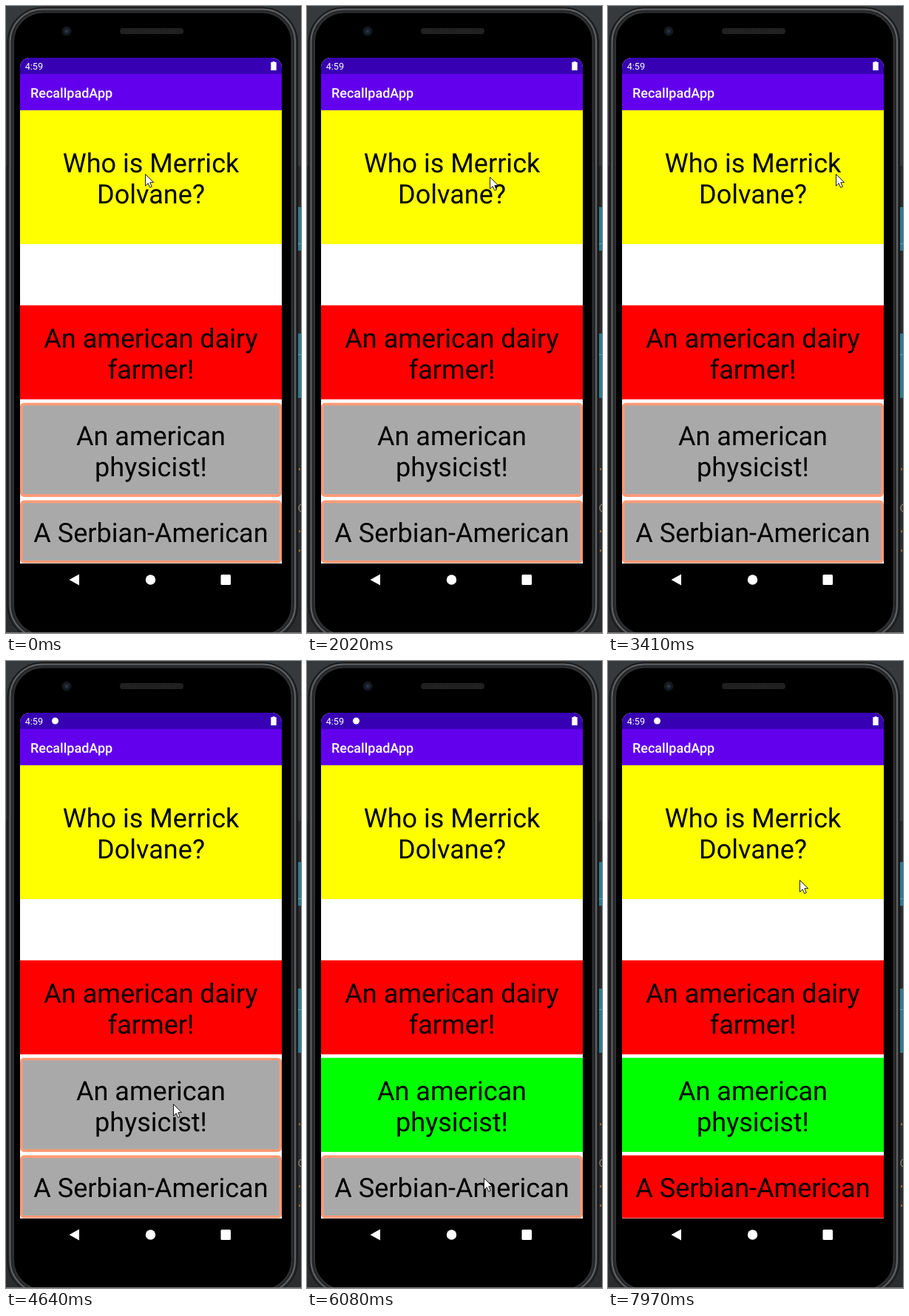
Animation, 399 px wide and 848 px high, one loop 8 s. Source, as an HTML page:

```html
<!DOCTYPE html>
<html lang="en">
<head>
<meta charset="utf-8">
<title>Flashcards</title>
<style>
  html, body { margin: 0; width: 100%; height: 100%; overflow: hidden; background: #2b2c2e; }
  svg { display: block; width: 399px; height: 848px; }
  text { font-family: Roboto, "Open Sans", sans-serif; text-rendering: geometricPrecision; }
  .big { font-size: 36.06px; text-anchor: middle; fill: #000; }
</style>
</head>
<body>
<svg viewBox="0 0 399 848">
  <defs>
    <clipPath id="screen"><path d="M19 754V83a13 13 0 0 1 13-13H360a13 13 0 0 1 13 13V754z"/></clipPath>
    <pattern id="mesh" width="3" height="3" patternUnits="userSpaceOnUse">
      <path d="M0 0h3v3h-3z" fill="#1d1d1d"/><path d="M0 0h1.5v1.5h-1.5z" fill="#2b2b2b"/>
    </pattern>
  </defs>

  <!-- desktop behind the phone -->
  <rect width="399" height="848" fill="#2b2c2e"/>
  <rect width="399" height="216" fill="#363a3c"/>
  <g fill="#2d7b91">
    <rect x="395" y="272" width="4" height="59"/>
    <rect x="395" y="443" width="4" height="87"/>
  </g>
  <path d="M395 321.5h4M395 471.5h4" stroke="#58a9bd"/>
  <path d="M397 625v3M397 709v3M397 735v3" stroke="#b57a35" stroke-width="1.5"/>
  <path d="M399 674.5q-3 0-3 4.5t3 4.5" fill="none" stroke="#b9a48c"/>

  <!-- phone body -->
  <rect x="393" y="217" width="3" height="54" rx="1" fill="#222426"/>
  <rect x="393" y="331" width="3" height="112" rx="1" fill="#222426"/>
  <rect x="2" y="2" width="392.5" height="856" rx="47" fill="#242527" stroke="#111"/>
  <rect x="5.5" y="4.5" width="385.5" height="850" rx="44" fill="none" stroke="#606264" stroke-width="2"/>
  <rect x="10" y="8.5" width="376.5" height="842" rx="40" fill="#000" stroke="#2e3031" stroke-width="2"/>
  <rect x="154" y="30" width="86" height="8" rx="4" fill="url(#mesh)"/>
  <circle cx="82" cy="34" r="6.5" fill="#14171b"/>
  <circle cx="82" cy="34" r="3.5" fill="#1e2531"/>
  <circle cx="82" cy="34" r="1.5" fill="#2e3b55"/>
  <path d="M0 847.5h399" stroke="#777"/>

  <g clip-path="url(#screen)">
    <rect x="19" y="70" width="354" height="684" fill="#fff"/>
    <rect x="19" y="70" width="354" height="22" fill="#3700b3"/>
    <rect x="19" y="92" width="354" height="49.5" fill="#6200ee"/>
    <text x="25.7" y="85.5" font-size="12.6" fill="#fff">4:59</text>
    <circle id="notice" cx="66.5" cy="81" r="4.5" fill="#fff"/>
    <path d="M360.5 75h3v1h2.2v11h-7.400v-11h2.200z" fill="#fff"/>
    <text x="33" y="124" font-size="18" font-weight="500" fill="#fff">RecallpadApp</text>
    <g id="cards"></g>
  </g>

  <g fill="#fff">
    <path d="M85.5 776L99 768.5v15z"/>
    <circle cx="195.5" cy="776" r="6.7"/>
    <rect x="290.5" y="769" width="13.5" height="14" rx="1.5"/>
  </g>
  <path id="cursor" d="M.5 .5V16.3L4.2 12.8L6.7 18.5L9.3 17.4L6.8 11.7H11.6z"
        fill="#fff" stroke="#000" stroke-width=".9" stroke-linejoin="round"/>
</svg>
<script>
const LOOP = 8000, STEP = 125, LINE = 42.3;
const GREY = "#a9a9a9", RED = "#f00", GREEN = "#0f0";
const $ = id => document.getElementById(id);

// Pointer strokes: first and last step in time, place reached, sideways bow
const home = { x: 188, y: 227 };
const strokes = [
  { from: 1070, to: 1460, x: 247, y: 231 },
  { from: 2420, to: 2700, x: 308, y: 227 },
  { from: 3710, to: 3860, x: 280, y: 239 },
  { from: 4010, to: 4640, x: 226, y: 599 },
  { from: 5600, to: 6080, x: 239, y: 699, bow: 54 },
  { from: 7150, to: 7420, x: 275, y: 555 },
  { from: 7560, to: 7710, x: 241, y: 377 },
  { from: 7850, to: 7970, x: 259, y: 296 }
];
const flips = [1070, 2020, 2850, 3410];
const NOTICE_AT = 4250, RIGHT_AT = 4920, WRONG_AT = 6470;

// Ease out into a resting place, in evenly timed jumps
function pointerAt(t) {
  let p = home;
  for (const s of strokes) {
    if (t < s.from) break;
    const count = Math.round((s.to - s.from) / STEP) + 1;
    const gap = (s.to - s.from) / (count - 1);
    const u = Math.min(1, (Math.floor((t - s.from) / gap + 0.02) + 1) / count);
    const bow = (s.bow || 0) * 4 * u * (1 - u);
    p = { x: p.x + (s.x - p.x) * u + bow, y: p.y + (s.y - p.y) * u };
  }
  return p;
}

function set(el, attrs) {
  for (const key in attrs) el.setAttribute(key, attrs[key]);
}

function add(parent, tag, attrs, label = "") {
  const el = document.createElementNS("http://www.w3.org/2000/svg", tag);
  set(el, attrs);
  el.textContent = label;
  parent.append(el);
  return el;
}

function card(y, height, fill, baseline, lines) {
  const group = add($("cards"), "g", {});
  const box = add(group, "rect", { x: 19, y, width: 354, height, fill });
  lines.forEach((line, i) =>
    add(group, "text", { class: "big", x: 196, y: baseline + i * LINE }, line));
  return { group, box, y, height };
}

// Choices are stacked with a fixed gap and as tall as their text
let nextTop = 404.8;
function choice(fill, ...lines) {
  const top = nextTop, height = 42.6 + lines.length * LINE;
  nextTop += height + 4.7;
  return card(top, height, fill, top + 56.8, lines);
}

const question = card(141, 181, "#ff0", 225, ["Who is Merrick", "Dolvane?"]);
const answer = card(141, 182, "#dcdcdc", 226.3, ["An american", "physicist!"]);
choice(RED, "An american dairy", "farmer!");
const right = choice(GREY, "An american", "physicist!");
const wrong = choice(GREY, "A Serbian-American");

function paint({ box, y, height }, picked, color) {
  const inset = picked ? 0 : 1.8;
  set(box, {
    x: 19 + inset, y: y + inset, width: 354 - 2 * inset, height: height - 2 * inset,
    rx: picked ? 0 : 3.5, fill: picked ? color : GREY,
    stroke: picked ? "none" : "#ff9a76", "stroke-width": 3.6
  });
}

const show = (el, on) => set(el, { visibility: on ? "visible" : "hidden" });

function draw(t) {
  const { x, y } = pointerAt(t);
  const flipped = flips.filter(time => time <= t).length % 2 === 1;
  set($("cursor"), { transform: `translate(${Math.round(x)} ${Math.round(y)})` });
  show(question.group, !flipped);
  show(answer.group, flipped);
  show($("notice"), t >= NOTICE_AT);
  paint(right, t >= RIGHT_AT, GREEN);
  paint(wrong, t >= WRONG_AT, RED);
}

const start = performance.now();
function tick() {
  draw((performance.now() - start) % LOOP);
  requestAnimationFrame(tick);
}
tick();
</script>
</body>
</html>
```
